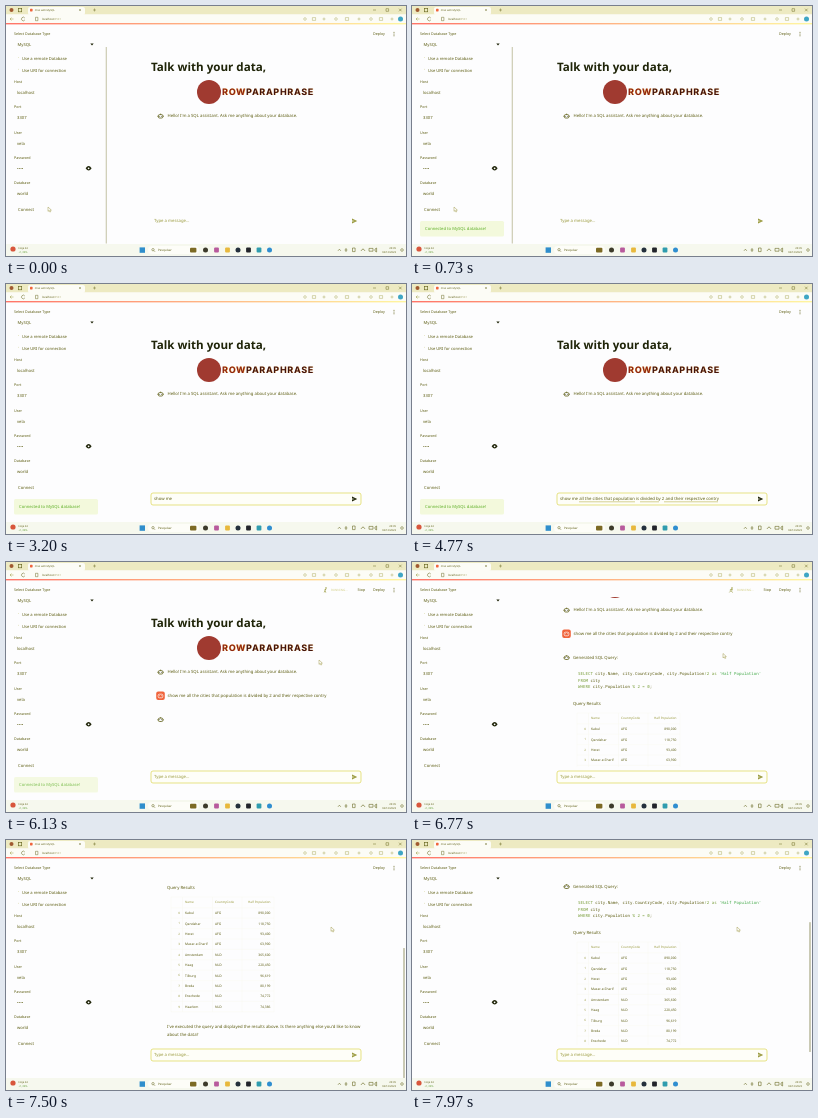
Recreate the animation shown at these times as an HTML page. Size 400x250 px, loop 8000 ms.

```html
<!DOCTYPE html>
<html lang="en">
<head>
<meta charset="utf-8">
<title>Chat with MySQL</title>
<style>
  html, body { margin: 0; width: 100%; height: 100%; overflow: hidden; background: #fdfdfe; }
  svg { display: block; width: 100vw; height: 100vh; }
  text { font-family: "Noto Sans", "Open Sans", sans-serif; white-space: pre; text-rendering: geometricPrecision; }
  .mono { font-family: "Noto Sans Mono", "DejaVu Sans Mono", monospace; }
  .mark { font-family: Inter, sans-serif; font-weight: 700; letter-spacing: .8px; }
</style>
</head>
<body>
<svg id="stage" viewBox="0 0 400 250" xmlns="http://www.w3.org/2000/svg"></svg>
<script>
const LOOP = 8000;
const PAGE = '#fdfdfe', INK = '#5e5e14', DARK = '#1f2408', DIM = '#9a9a3e', ORANGE = '#f0643c';
const QUESTION = 'show me all the cities that population is divided by 2 and their respective contry';

// Markup helpers; text is placed by its visual middle.
const text = (x, y, str, size = 4.27, attrs = '') =>
  `<text x="${x}" y="${y + size * .35}" font-size="${size}" fill="${INK}" ${attrs}>${str}</text>`;
const rect = (x, y, w, h, fill, attrs = '') =>
  `<rect x="${x}" y="${y}" width="${w}" height="${h}" fill="${fill}" ${attrs}/>`;
const dot = (x, y, r, fill, attrs = '') => `<circle cx="${x}" cy="${y}" r="${r}" fill="${fill}" ${attrs}/>`;
const line = (d, width = .6, color = INK, attrs = '') =>
  `<path d="${d}" fill="none" stroke="${color}" stroke-width="${width}" ${attrs}/>`;
const group = (id, body, attrs = '') => `<g id="${id}" ${attrs}>${body}</g>`;

function browser() {
  const tools = [299, 308, 318, 330, 341, 353, 365, 375, 386];
  return rect(0, 0, 400, 8.5, '#edeac2') + rect(0, 8.5, 400, 9, '#fcfcf6') +
    dot(5.5, 4, 2, '#a05a30') + rect(12.3, 2.4, 3.4, 3.4, 'none', `stroke="${INK}" stroke-width=".6"`) +
    rect(22, 1, 57, 8, '#fcfcf6', 'rx="2"') + rect(24, 2.8, 2.6, 2.6, ORANGE, 'rx=".6"') +
    text(28.8, 4, 'Chat with MySQL', 2.5) +
    line('M73 3l2 2m0-2l-2 2M87 4h3m-1.5-1.5v3', .4) +
    line('M367 4h3M380 2.7h2.6v2.6H380zM393 2.7l2.6 2.6m0-2.6l-2.6 2.6', .45) +
    line('M7.5 13H4m1.5-1.5L4 13l1.5 1.5', .5, DIM) + line('M18.8 12a1.8 1.8 0 1 0 .1 1.8', .5) +
    line('M29.5 11.3h2.4v3.4h-2.4z', .45) + text(36, 13, 'localhost:<tspan fill="#b5b27c">8501</tspan>', 2.8) +
    tools.map((x, i) => i % 3 == 1
      ? line(`M${x - 1.6} 11.6h3.2v2.8h-3.2z`, .4, DIM)
      : i % 3 ? line(`M${x - 1.5} 13h3m-1.5-1.5v3`, .4, DIM)
      : dot(x, 13, 1.3, 'none', `stroke="${DIM}" stroke-width=".4"`)).join('') +
    dot(394.5, 13, 2.5, '#3fa6c4');
}

function sidebar() {
  const fields = [['Host', 'localhost', 76], ['Port', '3307', 101], ['User', 'vela', 126.5],
    ['Password', '••••', 151.5], ['Database', 'world', 176.5]];
  const check = (y, label) => dot(12.4, y - 1.6, .4, '#c8c67c') + text(16, y, label, 4.1);
  return text(8, 28, 'Select Database Type', 3.66) + text(11.5, 38.5, 'MySQL', 4.18) +
    `<path d="M84.3 37.6h3.4l-1.7 2z" fill="${DARK}"/>` +
    check(53, 'Use a remote Database') + check(64.8, 'Use URI for connection') +
    fields.map(([label, value, y]) => text(8, y, label, 3.66) + text(11, y + 11, value, 4.18)).join('') +
    `<path d="M79.6 162.3q3-4.4 6 0q-3 4.4-6 0z" fill="${DARK}"/>` + dot(82.6, 162.3, .9, '#fff') +
    text(12, 204, 'Connect', 4.18) +
    rect(99.8, 41, .8, 196.5, '#b5b48e', 'id="sidebar-thumb"') +
    group('success', rect(8, 215, 84, 15.5, '#f3f9dc', 'rx="1.6"') +
      text(13, 223, 'Connected to MySQL database!', 4.18, 'style="fill:#5cae24"'));
}

const robot = y =>
  rect(152.4, y - 1.4, 4.4, 3.4, 'none', `rx="1.1" stroke="${INK}" stroke-width=".8"`) +
  line(`M154.6 ${y - 1.4}v-1M151.8 ${y - .2}v1M157.4 ${y - .2}v1`, .7) +
  dot(153.7, y + .2, .45, DARK) + dot(155.5, y + .2, .45, DARK);

const user = y =>
  rect(150.2, y - 4.3, 8.6, 8.6, ORANGE, 'rx="2"') +
  rect(152.2, y - 1.6, 4.6, 3.6, 'none', 'rx="1.2" stroke="#fff" stroke-width=".7"') +
  dot(153.6, y, .45, '#fff') + dot(155.4, y, .45, '#fff');

function table() {
  const cities = [['Kabul', 890000], ['Qandahar', 118750], ['Herat', 93400], ['Mazar-e-Sharif', 63900],
    ['Amsterdam', 365600], ['Haag', 220450], ['Tilburg', 96619], ['Breda', 80199],
    ['Enschede', 74772], ['Haarlem', 74386]];
  const soft = `style="fill:${DIM}"`, end = 'text-anchor="end"';
  const top = 229, step = 10.4;
  let out = text(179, 218, 'Name', 3.1, soft) + text(209, 218, 'CountryCode', 3.1, soft) +
    text(264.5, 218, 'Half Population', 3.1, `${soft} ${end}`);
  cities.forEach(([name, half], i) => {
    const y = top + i * step;
    out += line(`M165 ${y - 5.2}h103`, .3, '#f4f4e8') + text(174, y, i, 3, `${soft} ${end}`) +
      text(179, y, name, 3.3) + text(209, y, i < 4 ? 'AFG' : 'NLD', 3.3) +
      text(264.5, y, half.toLocaleString('en-US'), 3.3, end);
  });
  return out + line('M165 213h103v114.8H165zM176.5 213v114.8M206.5 213v114.8M236 213v114.8', .3, '#f4f4e8');
}

function answer() {
  const key = s => `<tspan fill="#759b35">${s}</tspan>`;
  const str = s => `<tspan fill="#45aa4c">${s}</tspan>`;
  const code = (y, s) => text(166, y, s, 4.13, 'class="mono"');
  return text(161, 157.5, 'Generated SQL Query:') +
    code(173.6, `${key('SELECT')} city.Name, city.CountryCode, city.Population${key('/2 as')} ${str("'Half Population'")}`) +
    code(180.4, `${key('FROM')} city`) +
    code(187, `${key('WHERE')} city.Population ${key('% 2 = 0')};`) +
    text(161, 204, 'Query Results') + table() +
    group('closing', text(161, 343, "I've executed the query and displayed the results above. Is there anything else you'd like to know") +
      text(161, 351, 'about the data?'));
}

function chat() {
  const name = (dx, lead, rest) =>
    text(216 + dx, 86, `<tspan fill="${lead}">ROW</tspan>PARAPHRASE`, 8.9, `class="mark" style="fill:${rest}"`);
  return text(145, 61, 'Talk with your data,', 11.6, `font-weight="700" style="fill:${DARK}"`) +
    dot(203, 86, 12, '#a03a30') + name(.5, '#f4b04c', '#f0b878') + name(0, '#8c2412', '#42140c') +
    robot(110) + text(161.5, 110, "Hello! I'm a SQL assistant. Ask me anything about your database.") +
    group('asked', user(133.8) + text(161.5, 133.8, QUESTION)) +
    group('bot', robot(157.5)) + group('answer', answer());
}

function header() {
  return rect(101, 17, 299, 18, PAGE) +
    `<linearGradient id="bar"><stop stop-color="#ff7468"/><stop offset="1" stop-color="#fff6a0"/></linearGradient>` +
    rect(0, 17, 400, 1.4, 'url(#bar)') +
    text(367, 28, 'Deploy', 3.66) + [26.2, 28, 29.8].map(y => dot(388, y, .5, INK)).join('') +
    group('running', dot(320, 26, .8, DIM) + line('', .7, DIM, 'id="legs"') +
      text(325, 28.3, 'RUNNING...', 3, 'style="fill:#d2ce84"') + text(351.5, 28, 'Stop', 3.66));
}

function composer() {
  return rect(101, 205, 296, 33, PAGE) +
    rect(145, 209, 210, 12, '#fefef8', 'id="focus" rx="2" stroke="#dcd652" stroke-width=".7"') +
    text(148, 215, 'Type a message...', 4.27, `id="hint" style="fill:${DIM}"`) +
    text(148, 215, '', 4.27, 'id="typed"') +
    line('M167 217.8H223M228 217.8H247M252 217.8H306', .5, '#a8a02c', 'id="spell"') +
    `<path id="send" d="M346 212.6l5.2 2.4l-5.2 2.4v-1.9l3-.5l-3-.5z"/>`;
}

function taskbar() {
  const apps = [[199.5, '#3c3a2a'], [210.5, '#b85a9c'], [221.5, '#e8b83c'], [232, '#24303c'],
    [242.5, '#22242a'], [253, '#2f9cae'], [263.5, '#2f8ed0']];
  return rect(0, 238, 400, 12, '#f6f8ee') +
    dot(7, 243, 2.6, '#d8563c') + text(12.5, 242, 'Hoje 24', 2.6) + text(12.5, 246, '+1,39%', 2.6, 'style="fill:#5f9c34"') +
    rect(133.6, 241.4, 5.4, 5.4, '#2f8ecc') +
    rect(142, 240, 51, 8, '#fdfdf8', 'rx="4"') + dot(147, 243.7, 1.2, 'none', `stroke="${INK}" stroke-width=".5"`) +
    line('M147.9 244.6l1.2 1.2', .5) + text(152, 244, 'Pesquisar', 3) +
    rect(184, 241.8, 6.4, 4.6, '#7c6a24', 'rx="1"') +
    apps.map(([x, c], i) => i % 3 == 0 ? dot(x, 244, 2.5, c) : rect(x - 2.4, 241.6, 4.8, 4.8, c, 'rx="1"')).join('') +
    line('M332 244.8l1.4-1.6l1.4 1.6M340 242v4M338.6 244h2.8M346.5 242h2.6v3.6h-2.6zM355 245q2-4 4 0M363 242.4h4v2.8h-4zM369 243v2l1.6 1v-4z', .55) +
    text(390, 242, '20:35', 2.6, 'text-anchor="end"') + text(390, 246, '02/12/2023', 2.6, 'text-anchor="end"') +
    dot(396, 244, 1.3, 'none', `stroke="${INK}" stroke-width=".5"`);
}

const stage = document.getElementById('stage');
stage.innerHTML = `<clipPath id="view">${rect(101, 35, 296, 170, '#000')}</clipPath>` +
  rect(0, 0, 400, 250, PAGE) + sidebar() +
  `<g clip-path="url(#view)">${group('page', chat())}</g>` +
  browser() + header() + composer() + rect(397.4, 0, 1.2, 0, '#a9a884', 'id="thumb" rx=".6"') + taskbar() +
  group('pointer',
    `<path id="arrow" d="M0 0v4.4l1.1-1l.8 1.7l.8-.4l-.8-1.6h1.5z" fill="#fff" stroke="#a09a4c" stroke-width=".5"/>` +
    line('M-1-2.6h2M0-2.6v5.2M-1 2.6h2', .5, INK, 'id="beam"'));

const el = {};
stage.querySelectorAll('[id]').forEach(n => el[n.id] = n);

// Motion: rows of [time, value...] eased between neighbours.
const SCROLL = [[6450, 0], [6770, 62], [7270, 156], [7530, 156], [7830, 111]];
const POINTER = [[0, 42, 201], [830, 42, 201], [1450, 159, 215], [5070, 159, 215], [5700, 330, 130],
  [6050, 313, 98], [6430, 313, 98], [6700, 311, 91.5], [6950, 311, 91.5], [7280, 325, 87]];
const TYPING = [[1930, 1], [2200, 2], [2430, 3], [2530, 6], [2770, 7], [3130, 8], [3470, 9], [3700, 10],
  [4070, 11], [4230, 48], [4270, QUESTION.length], [4930, 0]];

const clamp = v => Math.max(0, Math.min(1, v));
const fade = (t, start, span) => clamp((t - start) / span);
const show = (node, on) => node.setAttribute('opacity', +on);

function track(keys, t) {
  const i = keys.findIndex(k => k[0] > t);
  if (i < 0) return keys[keys.length - 1].slice(1);
  if (i == 0) return keys[0].slice(1);
  const a = keys[i - 1], b = keys[i];
  const u = (t - a[0]) / (b[0] - a[0]), e = u * u * (3 - 2 * u);
  return a.slice(1).map((v, j) => v + (b[j + 1] - v) * e);
}

function draw(t) {
  const [scroll] = track(SCROLL, t), [x, y] = track(POINTER, t);
  const typed = TYPING.reduce((n, [at, count]) => t >= at ? count : n, 0);

  show(el['sidebar-thumb'], t < 1000);
  show(el.success, fade(t, 430, 200) * (t < 6470) * (1 - .2 * fade(t, 5630, 300)));
  show(el.asked, fade(t, 5070, 200));
  show(el.bot, fade(t, 5630, 300));
  show(el.answer, fade(t, 6430, 150));
  show(el.closing, t >= 7200);
  el.page.setAttribute('transform', `translate(0 ${-scroll})`);

  show(el.running, t >= 5100 && t < 7270);
  const k = Math.floor(t / 150) % 2 ? 1.6 : .8;
  el.legs.setAttribute('d', `M319.6 27l-.6 1.6l${k} 2M319 28.6l${-k} 1.8M${319.4 - k} 28l${k}-.8l${k} .8`);

  el.typed.textContent = QUESTION.slice(0, typed);
  show(el.hint, !typed);
  show(el.focus, t >= 1450);
  show(el.spell, t >= 4270 && t < 4930);
  el.send.setAttribute('fill', typed ? DARK : DIM);

  show(el.thumb, t >= 6900);
  el.thumb.setAttribute('y', 18 + scroll * .577);
  el.thumb.setAttribute('height', 130);

  const beam = t >= 1380 && t < 5200;
  show(el.pointer, t < 1930 || t >= 5450);
  show(el.arrow, !beam);
  show(el.beam, beam);
  el.pointer.setAttribute('transform', `translate(${x} ${y})`);
}

const start = performance.now();
function tick() {
  draw((performance.now() - start) % LOOP);
  requestAnimationFrame(tick);
}
tick();
</script>
</body>
</html>
```
